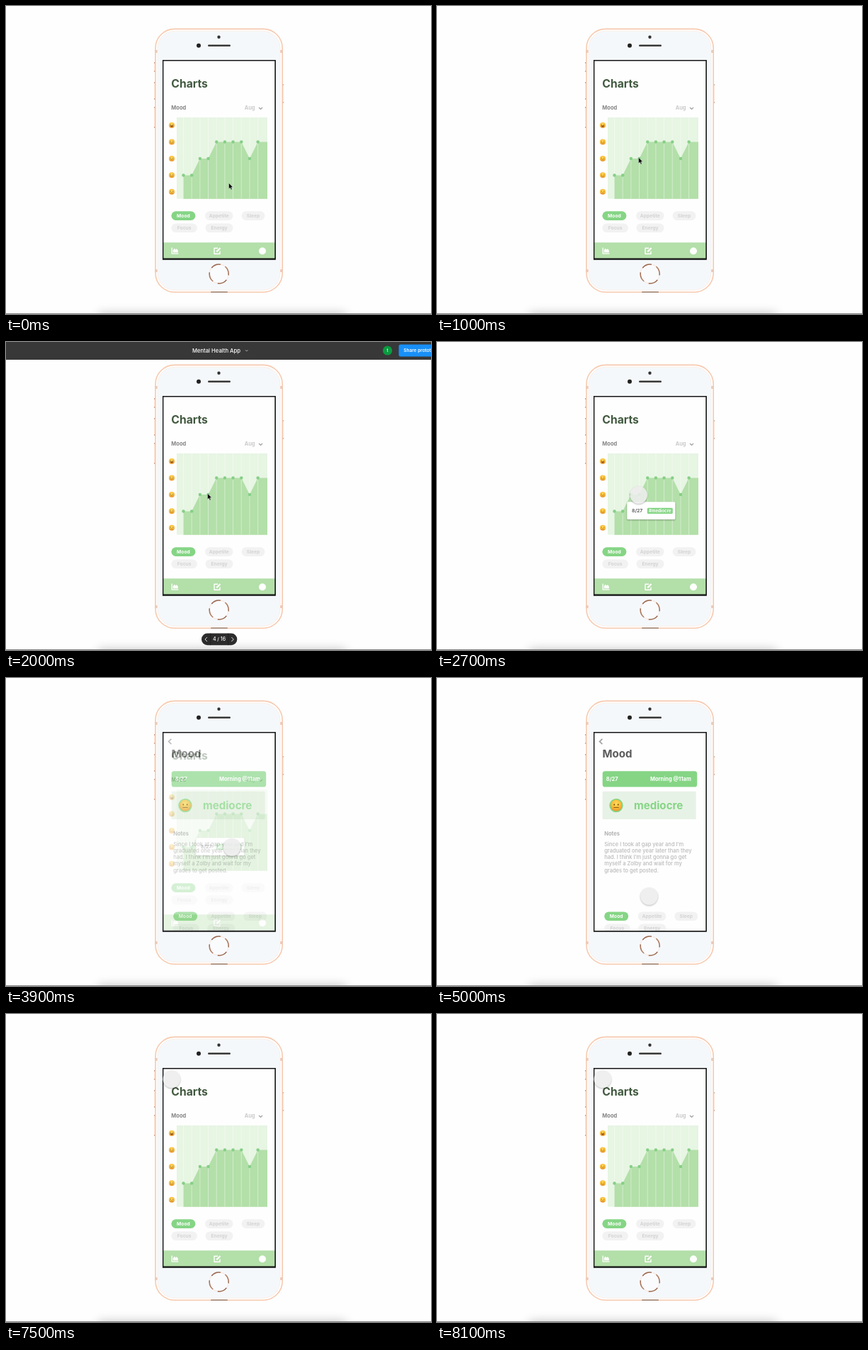
An HTML page for the animation above (8200 ms loop, 600x434 px).

```html
<!DOCTYPE html>
<html lang="en">
<head>
<meta charset="utf-8">
<title>Mood charts</title>
<style>
html, body { margin: 0; width: 100%; height: 100%; overflow: hidden; background: #fefefe; }
svg { display: block; width: 100vw; height: 100vh; }
text { font-family: Inter, Roboto, sans-serif; white-space: pre; }
#touch circle { filter: drop-shadow(0 1.2px .9px rgba(0, 0, 0, .3)); }
#tip > rect:first-child { filter: drop-shadow(0 1.2px 1.2px rgba(0, 0, 0, .3)); }
</style>
</head>
<body>
<svg id="stage" viewBox="0 0 600 434"></svg>
<script>
const LOOP = 8200, STEP = 100;
const GREEN = '#85d585', PALE = '#b3dfa9';

const rect = (x, y, w, h, fill, r = 0, more = '') =>
  `<rect x="${x}" y="${y}" width="${w}" height="${h}" rx="${r}" fill="${fill}" ${more}/>`;
const dot = (x, y, r, fill, more = '') =>
  `<circle cx="${x}" cy="${y}" r="${r}" fill="${fill}" ${more}/>`;
const line = (d, color, w, more = '') =>
  `<path d="${d}" fill="none" stroke="${color}" stroke-width="${w}" ${more}/>`;
const text = (x, y, size, fill, str, weight = 700, anchor = 'start') =>
  `<text x="${x}" y="${y}" font-size="${size}" font-weight="${weight}" fill="${fill}" text-anchor="${anchor}">${str}</text>`;
const group = (id, body) => `<g id="${id}">${body}</g>`;

// Faces are drawn in a unit circle and scaled up.
const MOUTHS = {
  grin: '<path d="M-.55 .1H.55A.55 .5 0 0 1-.55 .1Z" fill="#7a3f10"/>',
  smile: line('M-.5 .22Q0 .72 .5 .22', '#8a5414', .13),
  flat: line('M-.45 .35H.45', '#8a5414', .13),
  sad: line('M-.45 .55Q0 .1 .45 .55', '#8a5414', .13)
};
const face = (x, y, r, mood) =>
  `<g transform="translate(${x} ${y}) scale(${r})">` + dot(0, 0, 1, 'url(#skin)') +
  [-.34, .34].map(ex => `<ellipse cx="${ex}" cy="-.15" rx=".1" ry=".15" fill="#7a4a12"/>`).join('') +
  MOUTHS[mood] + '</g>';

// Filter pills, placed relative to the chart screen.
const PILLS = [
  ['Mood', 233.4, 289.3, 34], ['Appetite', 281, 289.3, 39.5], ['Sleep', 332.5, 289.3, 33],
  ['Focus', 233.4, 306.4, 36.5], ['Energy', 281.5, 306.4, 39]
];
const pills = (active, dx = 0, dy = 0) => `<g transform="translate(${dx} ${dy})">` +
  PILLS.map(([name, x, y, w]) => {
    const on = name === active;
    return rect(x, y, w, 12.6, on ? GREEN : '#f2f2f2', 6.3) +
      text(x + w / 2, y + 8.7, 6.7, on ? '#fff' : '#d3d3d3', name, 700, 'middle');
  }).join('') + '</g>';

function phone() {
  const keys = [[209, 79, 14], [209, 107, 25], [209, 142, 30], [390.2, 110, 27]]
    .map(([x, y, h]) => rect(x, y, 1.6, h, '#fae3d6', .6) +
      rect(x, y, 1.6, 2, '#cfa590') + rect(x, y + h - 2, 1.6, 2, '#cfa590')).join('');
  const bands = [[210.4, 62], [387.2, 62], [210.4, 371], [387.2, 371]]
    .map(([x, y]) => rect(x, y, 3.2, 4, '#ecc9b6')).join('');
  return keys +
    rect(211, 32.4, 179.2, 370.8, '#fff', 27, 'stroke="#f6cab0" stroke-width="1.6"') +
    rect(214, 35.2, 173.2, 365.2, '#f5f8fb', 24.5, 'stroke="#fcefe7" stroke-width="1"') +
    bands +
    rect(289, 402.2, 24, 1.7, '#a98f81', .7) +
    dot(272, 55.8, 3, '#222') + dot(300.5, 43.8, 2.2, '#333') +
    rect(285, 54.5, 32, 2.5, '#383838', 1.2) +
    dot(300.7, 377.5, 13.5, '#fafbfd', 'stroke="#f6ebe5" stroke-width="1.3"') +
    dot(300.7, 377.5, 13.5, 'none', 'stroke="url(#ring)" stroke-width="1.5" stroke-dasharray="14.1 7.1" stroke-dashoffset="12.2"');
}

function chart() {
  const x = i => 250.5 + i * 11.68;
  const y = [1, 1, 2, 2, 3, 3, 3, 3, 2, 3].map(v => 262 - v * 23.5);
  const pts = y.map((v, i) => `${x(i)} ${v}`);
  return rect(241, 157, 128, 114.5, '#e7f5e3') +
    `<path d="M250 271.8V${y[0]}L${pts.join('L')}H369V271.8Z" fill="${PALE}"/>` +
    y.map((v, i) => rect(x(i) - .5, 157, 1, 114.5, '#fff', 0, 'opacity=".42"')).join('') +
    y.map((v, i) => dot(x(i), v, 2.2, '#85cf87')).join('');
}

function chartsPage() {
  const moods = ['grin', 'smile', 'flat', 'smile', 'sad'];
  return rect(222, 77, 158, 280, '#fefefe') +
    text(233.3, 115, 15.7, '#41593f', 'Charts') +
    text(233.3, 146, 7.5, '#858585', 'Mood') +
    text(336.7, 146, 7.4, '#cbcbcb', 'Aug') +
    line('M357 143L359.5 145.4L362 143', '#a2a2a2', 1.4) +
    chart() +
    moods.map((m, i) => face(234, 168 + i * 23.45, 4, m)).join('') +
    pills('Mood') +
    rect(222, 333.3, 158, 23, PALE) +
    rect(222, 355.4, 158, 1.6, '#161616') +
    line('M234.2 340.5V348.8H243.5', '#fff', 1.3) +
    '<path d="M235.8 347.3V344L237.8 341.5L239.4 343.5L241 342L242.8 344.5V347.3Z" fill="#fff"/>' +
    line('M299 341.3H294V349.3H302V345.5', '#fff', 1.4, 'stroke-linejoin="round"') +
    line('M297.3 346.3L302.5 341', '#fff', 2.3) +
    dot(362, 345.2, 5, '#fff');
}

function detailPage(title, word, wordX, mood, notes, pillY) {
  return rect(222, 77, 158, 280, '#fefefe') +
    line('M233.4 85.8L229.6 89.5L233.4 93.2', '#a0a0a0', 1.7) +
    text(233.4, 112, 15.1, '#5b5b5b', title) +
    rect(233.7, 131.2, 133.5, 22.4, GREEN, 3.6) +
    text(238.8, 145.2, 7.5, '#fff', '8/27') +
    text(358.8, 145.2, 7.5, '#fff', 'Morning @11am', 700, 'end') +
    rect(233.7, 159.7, 132, 39.3, '#e7f2e6', 1) +
    dot(253, 179.6, 9.7, GREEN) + face(253, 179.6, 8, mood) +
    text(wordX, 185.2, 15.1, GREEN, word) +
    text(236.2, 222.2, 7.5, '#b1b1b1', 'Notes') +
    notes.map((s, i) => text(236.2, 236.6 + i * 9.25, 7.5, '#b9b9b9', s, 500)).join('') +
    pills(title, 2.8, pillY);
}

const tip = () =>
  rect(268.3, 225.3, 68, 24.8, '#fff', 1.5) +
  text(275, 240.4, 6.8, '#666', '8/27') +
  rect(296.8, 233.8, 36, 8.3, GREEN, 1.5) +
  text(314.8, 240.1, 6, '#fff', '#mediocre', 700, 'middle');

const bars = () =>
  rect(0, 0, 600, 25, '#383838') +
  text(297, 15.2, 7.7, '#fff', 'Mental Health App', 500, 'middle') +
  line('M338 11.3L339.7 13L341.4 11.3', '#c4c4c4', .9) +
  dot(538.6, 12, 6.6, '#0b9b40') +
  text(538.6, 14.3, 6, '#fff', 't', 500, 'middle') +
  rect(554.5, 3.6, 60, 17, '#1890f8', 2.5) +
  text(561.3, 14.4, 6.5, '#fff', 'Share prototype', 600) +
  rect(276, 410.6, 50.3, 16.6, '#2c2c2c', 8.3) +
  rect(288.4, 410.6, .7, 16.6, '#1c1c1c') + rect(313.4, 410.6, .7, 16.6, '#1c1c1c') +
  text(301, 421.4, 7, '#fff', '4 / 16', 500, 'middle') +
  line('M284 416L281 419L284 422', '#eee', .9) +
  line('M318.3 416L321.3 419L318.3 422', '#eee', .9);

const moodNotes = [
  'Since I took at gap year and I’m', 'graduated one year later than they',
  'had. I think I’m just gonna go get', 'myself a Zolby and wait for my', 'grades to get posted.'
];
const foodNotes = [
  'I’m getting a bit hungry cuz it’s', 'close to noon so I think I’m gonna',
  'make myself some miso udon.'
];

document.getElementById('stage').innerHTML = `
<defs>
  <radialGradient id="skin" cx=".5" cy=".35" r=".65">
    <stop offset="0" stop-color="#ffdc5c"/><stop offset=".6" stop-color="#f9bd38"/>
    <stop offset="1" stop-color="#e8922a"/>
  </radialGradient>
  <linearGradient id="ring" x2="1" y2="1">
    <stop offset="0" stop-color="#86513a"/><stop offset=".5" stop-color="#b9846a"/>
    <stop offset="1" stop-color="#86513a"/>
  </linearGradient>
  <filter id="soft" x="-20%" y="-200%" width="140%" height="500%"><feGaussianBlur stdDeviation="7"/></filter>
  <clipPath id="screen"><rect x="222" y="77" width="158" height="280"/></clipPath>
</defs>` +
  rect(0, 0, 600, 434, '#fefefe') +
  rect(130, 432, 350, 14, '#000', 4, 'opacity=".2" filter="url(#soft)"') +
  rect(0, 433, 600, 1, '#858585') +
  phone() +
  rect(221.7, 76.8, 158.3, 280, 'none', 0, 'stroke="#161616" stroke-width="1.5"') +
  `<g clip-path="url(#screen)">` +
  group('charts', chartsPage()) +
  group('tip', tip()) +
  group('mood', detailPage('Mood', 'mediocre', 278, 'flat', moodNotes, 40.2)) +
  group('food', detailPage('Appetite', 'hungry', 300.8, 'smile', foodNotes, 22)) +
  '</g>' +
  rect(221.7, 76.8, 158.3, 280, 'none', 0, 'stroke="#161616" stroke-width="1.4"') +
  group('bars', bars()) +
  group('touch', dot(0, 0, 12.3, '#eeeeee')) +
  group('arrow', '<path d="M0 0V8.2L1.9 6.5L3.2 9.4L4.6 8.8L3.3 6H5.8Z" fill="#000" stroke="#fff" stroke-width=".4"/>');

// Each track: [time, value, ...]; linear opacity, eased position.
const FADES = {
  bars: [[1600, 0], [1700, .09], [1900, 1], [2300, 1], [2600, 0]],
  tip: [[2400, 0], [2600, 1], [5000, 1], [5001, 0]],
  mood: [[3700, 0], [4000, 1], [5900, 1], [5901, 0]],
  food: [[5600, 0], [5900, 1], [7200, 1], [7500, 0]],
  arrow: [[2200, 1], [2201, 0]],
  touch: [[2200, 0], [2400, .88]]
};
const MOVES = {
  arrow: [[0, 314.6, 249.5], [900, 284.6, 213.6]],
  touch: [[2800, 284.7, 215.5], [3500, 319, 238.5], [4700, 319, 238.5], [5000, 299.5, 307.5],
    [5400, 304.5, 333], [6500, 304.5, 333], [6700, 256, 123], [6800, 256, 123], [7000, 233.8, 91.8]]
};
const ease = p => p * p * (3 - 2 * p);

function sample(track, t, curve = p => p) {
  const n = track.findIndex(k => k[0] > t);
  if (n < 0) return track[track.length - 1].slice(1);
  if (n === 0) return track[0].slice(1);
  const a = track[n - 1], b = track[n];
  const p = curve((t - a[0]) / (b[0] - a[0]));
  return a.slice(1).map((v, i) => v + (b[i + 1] - v) * p);
}

function draw(now) {
  const t = Math.floor((now % LOOP) / STEP) * STEP;
  for (const id in FADES)
    document.getElementById(id).setAttribute('opacity', sample(FADES[id], t)[0]);
  for (const id in MOVES)
    document.getElementById(id).setAttribute('transform', `translate(${sample(MOVES[id], t, ease)})`);
}

const start = performance.now();
function tick() {
  draw(performance.now() - start);
  requestAnimationFrame(tick);
}
tick();
</script>
</body>
</html>
```
